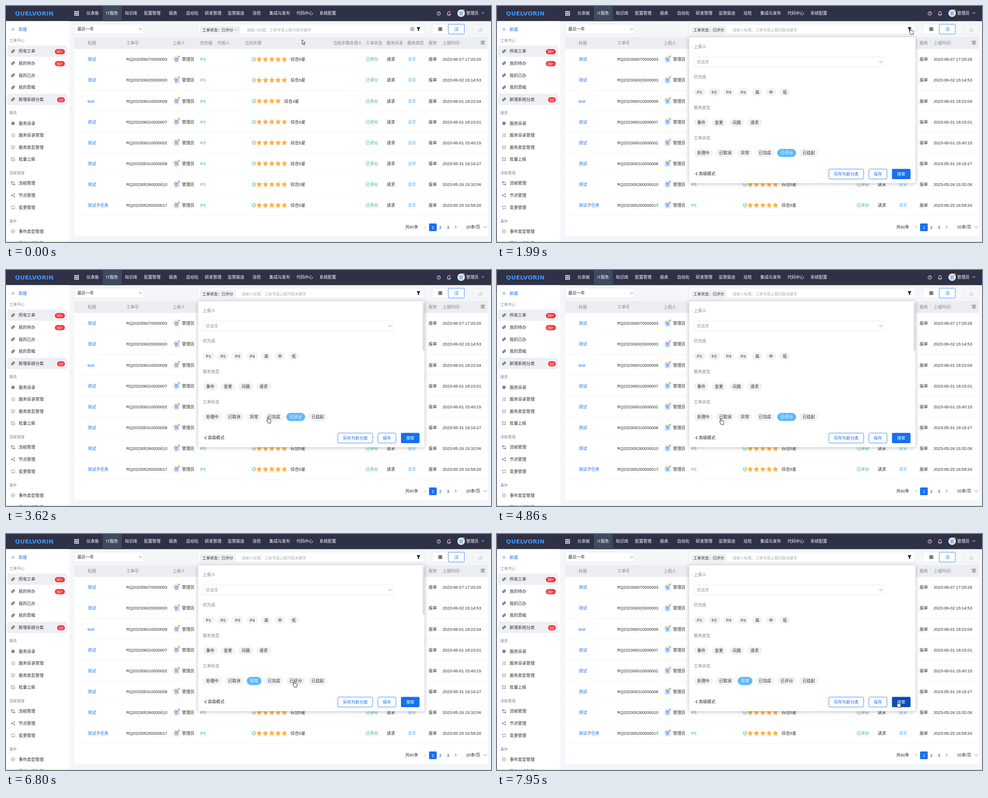
An HTML page for the animation above (8 s loop, 1072x522 px).

```html
<!DOCTYPE html>
<html lang="zh-CN">
<head>
<meta charset="utf-8">
<title>工单中心</title>
<style>
html, body { margin: 0; width: 100%; height: 100%; overflow: hidden; background: #f5f6fa; }
svg { display: block; width: 1072px; height: 522px; }
text { font: 9.2px "Liberation Sans", "Noto Sans CJK SC", "Noto Sans CJK JP", "Noto Sans CJK", sans-serif; white-space: pre; }
.mid { text-anchor: middle; }
.line { fill: none; stroke-linecap: round; stroke-linejoin: round; }
#panel { filter: drop-shadow(0 1px 4px rgba(0, 0, 0, .28)); }
</style>
</head>
<body>
<svg id="stage" viewBox="0 0 1072 522"></svg>
<script>
const INK = '#2b2c30', GRAY = '#85878d', BLUE = '#1670f0', SKY = '#5fb8fb', GREEN = '#2fb065', PILL = '#f3f3f6';
const ROW = 46.1;

const text = (x, y, s, fill = INK, size = 9.2, cls = '') =>
  `<text x="${x}" y="${y + size * .36}" fill="${fill}" class="${cls}" style="font-size:${size}px">${s}</text>`;
const mid = (x, y, s, fill, size) => text(x, y, s, fill, size, 'mid');
const box = (x, y, w, h, fill, r = 0, more = '') =>
  `<rect x="${x}" y="${y}" width="${w}" height="${h}" rx="${r}" fill="${fill}" ${more}/>`;
const line = (d, color = INK, w = 1) => `<path class="line" d="${d}" stroke="${color}" stroke-width="${w}"/>`;
const at = (x, y, inner, id = '') => `<g ${id && `id="${id}"`} transform="translate(${x} ${y})">${inner}</g>`;
const dot = (x, y, r, fill) => `<circle cx="${x}" cy="${y}" r="${r}" fill="${fill}"/>`;
const ring = (x, y, r, color, w = .9) => `<circle cx="${x}" cy="${y}" r="${r}" fill="none" stroke="${color}" stroke-width="${w}"/>`;
const down = (x, y, color = '#666') => line(`M${x - 2.8} ${y - 1.4}l2.8 2.8 2.8 -2.8`, color);
const border = color => `stroke="${color}" stroke-width="1"`;

function star(x, y, r, fill) {
  const pts = Array.from({ length: 10 }, (_, i) => {
    const a = i * Math.PI / 5, q = i % 2 ? r * .52 : r;
    return `${(x + q * Math.sin(a)).toFixed(2)},${(y - q * Math.cos(a)).toFixed(2)}`;
  });
  return `<polygon points="${pts.join(' ')}" fill="${fill}" stroke="${fill}" stroke-width=".8" stroke-linejoin="round"/>`;
}

const list = (x, y, color, w = 1) => [-3, 0, 3].map(d =>
  line(`M${x - 4} ${y + d}h.4M${x - 1.8} ${y + d}h5.8`, color, w)).join('');

const avatar = (x, y) => dot(x, y, 8.3, '#e8edf6') + mid(x, y + .3, '管', '#2b7de0', 9.4) +
  `<path d="M${x + 3} ${y - 7.6}l2.4 -1.2 2.4 1.6 -1.2 3.2 -2.6 -.8z" fill="#f9a83a"/>`;

function topBar() {
  const tabs = [[178, '仪表板'], [221, 'IT服务'], [263, '知识库'], [305, '配置管理'], [360, '报表'], [398, '自动化'],
    [439.5, '研发管理'], [490, '监管报送'], [545, '巡检'], [582, '集成与发布'], [642, '代码中心'], [693, '系统配置']];
  let s = box(0, 0, 1072, 33.5, '#2f3146') + box(214, 0, 42, 33.5, '#3d4a60');
  s += `<text x="20" y="20.5" fill="#3f97f6" style="font:bold 13px 'DejaVu Sans',sans-serif;letter-spacing:.2px">QUELVORIN</text>`;
  for (let i = 0; i < 9; i++) s += box(151 + i % 3 * 3.7, 11.3 + (i / 3 | 0) * 3.7, 2.7, 2.7, '#fff');
  s += tabs.map(([x, name]) => text(x, 16, name, '#fff')).join('');
  s += ring(956.5, 16.5, 3.9, '#fff', 1) + mid(956.5, 16.6, '?', '#fff', 6.5);
  s += '<path d="M975 19.3q1.3 -1 1.3 -4.3a2.7 2.7 0 0 1 5.4 0q0 3.300 1.300 4.300z" fill="none" stroke="#fff"/>' +
    line('M978 21.200h2', '#fff') + dot(980, 11.6, 1.8, '#f5333f');
  return s + avatar(1006, 16) + text(1017, 16, '管理员', '#fff') + down(1054, 15.5, '#fff');
}

const icons = {
  tag: '<g transform="rotate(-45)"><rect x="-4.500" y="-2.500" width="9" height="5" rx="1.300" fill="#777a80"/><path d="M-2.500 0H2" stroke="#fff" stroke-width=".8"/></g>',
  star: star(0, .3, 4.6, '#777a80'),
  list: list(0, 0, '#777a80', .9),
  bolt: ring(0, 0, 4, '#777a80', .8) + line('M.6 -2L-1.200 .5H1.200L-.5 2.300', '#777a80', .8),
  check: line('M4 0V3.500H-4V-3.500H4M-2 -1H1M-1.500 1L0 2.300 4 -1.500', '#777a80', .8),
  flow: line('M-2.500 -1V3H2M2.500 1V-3H-1', '#777a80') + box(-4.300, -4, 3, 3, '#777a80', 1) + box(1.500, 1.300, 3, 3, '#777a80', 1),
  share: line('M3 -3L-3 0 3 3', '#777a80') + dot(-3, 0, 1.400, '#777a80') + dot(3, -3, 1.300, '#777a80') + dot(3, 3, 1.300, '#777a80'),
  swap: line('M-3.800 0V-2.600H3.500L2 -4M3.800 0V2.600H-3.500L-2 4', '#777a80', .9),
  hex: line('M0 -4L3.600 -2V2L0 4 -3.600 2V-2Z', '#777a80', .8) + ring(0, 0, 1.300, '#777a80', .8)
};

function sideBar() {
  const items = [[100, 'tag', '所有工单'], [126.5, 'tag', '我的待办'], [153.3, 'tag', '我的已办'], [180, 'tag', '我的草稿'],
    [206.5, 'tag', '新增系统分类'], [259.3, 'star', '服务目录'], [286, 'list', '服务目录管理'], [312.5, 'bolt', '服务类型管理'],
    [339, 'check', '批量上报'], [392, 'flow', '流程管理'], [419, 'share', '节点管理'], [445.5, 'swap', '变更管理'],
    [498.5, 'hex', '事件类型管理'], [525, 'hex', '事件过程管理']];
  const heads = [[76, '工单中心'], [236, '服务'], [369, '流程管理'], [476, '事件']];
  const badge = (x, y, w, s) => box(x, y - 5.8, w, 11.6, '#f5333a', 5.8) + mid(x + w / 2, y, s, '#fff', 8.6);
  return box(0, 33.5, 139.5, 488.5, '#fff') + box(3, 87.500, 132, 25, '#eeeff3', 4) + box(3, 194, 132, 25, '#eeeff3', 4) +
    line('M12 51.500h7M15.500 48v7', '#4b90f2', .9) + text(28, 52, '新建', BLUE) +
    heads.map(([y, s]) => text(7.5, y, s, GRAY, 8.4)).join('') +
    items.map(([y, icon, s]) => at(15.5, y, icons[icon]) + text(28, y, s)).join('') +
    badge(108, 101, 22, '99+') + badge(108, 127.5, 22, '99+') + badge(113, 207.5, 17, '60');
}

const filterTag = (id, w, hint) => `<g id="${id}">` + box(429, 44.5, w, 16.5, '#eff0f4', 2) +
  text(434, 52.5, '工单状态：已评分', INK, 8.5) + text(hint, 53, '请输入标题、工单号或上报内容关键字', '#a9abb0', 8.4);

function toolBar() {
  const edge = border('#e6e7ec');
  return box(151, 40, 153.500, 22, '#fff', 3, edge) + text(157.5, 51, '最近一年') + down(297.5, 51) +
    box(425, 40, 499.500, 22.500, '#fff', 3, edge) +
    filterTag('tagHover', 89, 532) + line('M506 50.500l4 4M510 50.500l-4 4', '#aaa', .8) +
    ring(898, 51.2, 3.9, '#444') + line('M896.500 49.700l3 3M899.500 49.700l-3 3', '#444', .9) + '</g>' +
    filterTag('tagPlain', 78, 521) + '</g>' +
    '<path d="M907.500 47h8.500l-3 4.300v4.500l-2.500 -1.500v-3z" fill="#17181c"/>' +
    box(942.500, 40.300, 35, 21.700, '#fff', 3, edge) +
    [0, 1, 2, 3].map(i => box(956.3 + i % 2 * 4.2, 47.500 + (i >> 1) * 4.2, 2.900, 2.900, '#fff', 0, border('#333'))).join('') +
    box(977.500, 40.300, 35.500, 21.700, '#fff', 2, border('#3d87f4')) + list(995.5, 51.3, BLUE) +
    box(1032.500, 40.300, 32.500, 21.700, '#f6f7f9', 3, edge) +
    line('M1045 51.500v4h7.500v-4M1048.700 47.500v5M1047 51l1.700 1.700 1.700 -1.700', '#b3b5ba', .9);
}

function table() {
  const cols = [[180.5, '标题'], [266, '工单号'], [368, '上报人'], [429, '优先级'], [467, '代报人'], [528, '当前步骤'], [723, '当前步骤处理人'],
    [795, '工单状态'], [841, '服务目录'], [887, '服务类型'], [934, '服务'], [965, '上报时间']];
  const rows = [['测试', '06070000003', '06-07 17:20:26'], ['测试', '06020000003', '06-02 15:14:53'], ['test', '06010000009', '06-01 18:22:04'],
    ['测试', '06010000007', '06-01 18:15:01'], ['测试', '06010000002', '06-01 15:40:15'], ['测试', '05310000008', '05-31 18:16:27'],
    ['测试', '05260000010', '05-26 15:32:06'], ['测试子任务', '05250000017', '05-25 16:59:20']];
  const row = ([title, no, date], i) => {
    const stars = i == 2 ? 4 : 5;
    let s = text(180.5, 0, title, BLUE) + text(266, 0, 'RQ2023' + no) + avatar(377, 0) + text(389, 0, '管理员') + text(429.5, 0, 'P3', GREEN);
    s += ring(548, 0, 3.9, GREEN) + line('M546.200 .1l1.400 1.400 2.400 -2.700', GREEN, .9);
    for (let k = 0; k < stars; k++) s += star(559.7 + k * 13.9, .2, 5.8, '#fdb24f');
    s += text(559.5 + stars * 13.9, 0, `综合${stars}星`) + text(795, 0, '已评分', GREEN) + text(841.5, 0, '请求') +
      text(888, 0, '请求', SKY) + text(934, 0, '报单') + text(965, 0, '2023-' + date);
    return at(0, 118 + i * ROW, s) + line(`M151 ${95 + (i + 1) * ROW}H1065`, '#f1f2f4', .9);
  };
  const eye = '<path d="M954.500 0q4.500 -5.500 9 0q-4.500 5.500 -9 0z" fill="#222"/>' + dot(959, 0, 1.5, '#fff') + line('M955.500 -3.500l7 7', '#222', 1.1);
  const bin = box(1008.5, -2.500, 6.200, 6.700, '#222', .8) + box(1007.800, -4.300, 7.600, 1.300, '#222') + line('M1010.500 -1v3.500M1012.700 -1v3.500', '#fff', .7);
  return box(150.500, 69, 914.500, 439, '#fff', 4) + box(150.500, 69, 914.500, 26, '#ecedf1', 3) +
    cols.map(([x, s]) => text(x, 82, s, GRAY)).join('') +
    '<path d="M1002.500 81l1.800 -2 1.800 2zM1002.500 83l1.800 2 1.800 -2z" fill="#cdced3"/>' + list(1053.5, 81, INK) +
    at(0, 0, box(151, -23, 911, 45.500, '#ebecf0'), 'glow') +
    rows.map(row).join('') +
    at(0, 0, line('M162 3.800C157.500 .8 157 -2 159 -3.200Q161 -4 162 -1.900Q163 -4 165 -3.200C167 -2 166.500 .8 162 3.800Z', '#f08a4b', .9) +
      box(925, -22, 137, 44, '#ebecf0') + eye + text(966.5, 0, '隐藏') + line('M994.700 -3.500v7', '#aaa', .8) +
      bin + text(1018.5, 0, '删除') + line('M1055 -3l2.600 3 -2.600 3', '#6aa6f5', .9), 'actions') +
    `<g id="bars">${box(1061.500, 95, 3.500, 150, '#dcdde0', 1.700)}${box(152, 467.500, 738, 3.700, '#dcdde0', 1.800)}</g>`;
}

function pager() {
  return text(882.5, 489, '共60条') + line('M928.300 486l-2.800 3 2.800 3', '#aaa', .9) + box(935, 481, 17, 17, BLUE, 2) +
    mid(943.5, 489.5, '1', '#fff') + mid(960, 489.5, '2') + mid(977, 489.5, '3') + line('M992.500 486l2.800 3 -2.800 3', '#444', .9) +
    text(1017, 489, '20条/页') + down(1059.5, 489.5);
}

const pills = [];
function pillRow(y, w, items) {
  return items.map(([x, s, own = w]) => {
    pills.push([x - own / 2, y - 9, own, 18]);
    return `<g id="p${pills.length}">` + box(x - own / 2, y - 9, own, 18, PILL, 9) + mid(x, y, s) + '</g>';
  }).join('');
}

function panel() {
  const button = (x, w, s) => box(x, 360.700, w, 22, '#fff', 2.500, border('#3d87f4')) + mid(x + w / 2, 372, s, BLUE);
  const heads = [[90, '上报人'], [157, '优先级'], [224.5, '服务类型'], [292, '工单状态']];
  return '<g id="panel">' + box(424.500, 69, 500.500, 323, '#fff', 3) + heads.map(([y, s]) => text(435, y, s, GRAY)).join('') +
    box(435.500, 113, 420.500, 22, '#fff', 3, 'id="pick" stroke="#e6e7ec"') + text(441, 124, '请选择', '#a0a2a8') + down(848.5, 124) +
    pillRow(190.5, 25, [[447.7, 'P1'], [480, 'P2'], [512, 'P3'], [544.3, 'P4'], [575.3, '高', 23], [605.7, '中', 23], [636, '低', 23]]) +
    pillRow(258, 32.5, [[451.5, '事件'], [490.5, '变更'], [530, '问题'], [569.3, '请求']]) +
    pillRow(325, 41.7, [[456, '处理中'], [504.5, '已取消'], [548.3, '异常', 32.5], [592, '已完成'], [640.3, '已评分'], [689, '已挂起']]) +
    line('M442.500 368.300l-3 2.900 3 2.900', INK, 1.1) + text(446, 371, '高级模式') +
    button(733.500, 77, '另存为新分类') + button(822, 40, '保存') +
    box(873, 360.300, 41, 22.700, BLUE, 2.500, 'id="go"') + mid(893.5, 372, '搜索', '#fff') +
    box(921, 72, 4, 107, '#dcdde0', 2, 'id="scroll"') + '</g>';
}

const pointers = '<g id="cursor" stroke="#111" stroke-width=".9" stroke-linejoin="round" fill="#fff">' +
  '<path id="arrow" d="M.4 .4V10.500L2.700 8.400 4.300 12 6 11.300 4.500 7.700H7.500Z"/>' +
  '<path id="hand" d="M-1.200 8V1.500a1.200 1.200 0 0 1 2.400 0V5.200l4.200 .9q1.400 .4 1.400 1.800l-.9 4V13.600H-.2V12.200L-2.900 8.700q-.5 -1.300 .6 -1.600z"/></g>';

const stage = document.getElementById('stage');
stage.innerHTML = box(0, 0, 1072, 522, '#f5f6fa') + topBar() + sideBar() + toolBar() + table() + pager() + panel() +
  box(0, 521, 1072, 1, '#cfd1d6') + pointers;
const $ = id => document.getElementById(id);
const show = (id, on) => { $(id).style.display = on ? '' : 'none'; };

// start, end, step count, then [step, x, y] waypoints
const moves = [
  [420, 1220, 11, [3, 705, 69], [6, 850, 56], [8, 961, 46], [11, 920, 47]],
  [1370, 1600, 4, [4, 914, 49]],
  [2300, 3080, 11, [1, 908, 56], [3, 860, 96], [6, 700, 165], [9, 570, 250], [11, 543, 274]],
  [3150, 3770, 9, [5, 582, 318], [7, 579, 325], [9, 545, 328]],
  [4000, 4320, 5, [5, 485, 332]],
  [4470, 5010, 8, [6, 495, 328], [8, 539, 320]],
  [5180, 5180, 1, [1, 540, 320]],
  [5330, 5420, 2, [2, 540, 322]],
  [5630, 5630, 1, [1, 540, 321]],
  [6260, 6490, 4, [4, 637, 325]],
  [7120, 7870, 11, [1, 690, 335], [2, 785, 355], [3, 868, 386], [4, 935, 387], [6, 936, 388], [8, 905, 379], [11, 880, 364]],
  [7950, 7950, 1, [1, 886, 370]]
];

function cursorAt(t) {
  let x = 654, y = 74;
  for (const [start, end, count, ...stops] of moves) {
    if (t < start) break;
    const step = Math.min(count, 1 + Math.floor((t - start) / (end - start || 1) * (count - 1)));
    let from = 0;
    for (const [n, sx, sy] of stops) {
      const u = Math.min(1, (step - from) / (n - from));
      x += (sx - x) * u;
      y += (sy - y) * u;
      if (u < 1 || step === n) break;
      from = n;
    }
  }
  return [x, y];
}

const inside = (x, y, [l, t, w, h]) => x >= l && x < l + w && y >= t && y < t + h;
const pick = [435, 113, 421, 22], go = [873, 360, 41, 23];
const panelHot = [pick, go, [733, 360, 78, 23], [822, 360, 40, 23], ...pills];
const alwaysHot = [[905, 44, 14, 15], [942, 40, 71, 22]];

function setPill(id, fill, color) {
  const g = $(id);
  g.firstChild.setAttribute('fill', fill);
  g.lastChild.setAttribute('fill', color);
}

function draw(t) {
  const open = t >= 1990, [x, y] = cursorAt(t);
  const over = r => inside(x, y, r);
  const onPanel = open && over([424, 69, 501, 323]);
  const onTable = !onPanel && over([151, 95, 914, 368]);
  const hand = alwaysHot.some(over) || open && panelHot.some(over);

  show('tagHover', !open);
  show('tagPlain', open);
  show('panel', open);
  show('scroll', onPanel && y < 350);
  for (const id of ['glow', 'actions', 'bars']) show(id, onTable);
  if (onTable) {
    const shift = `translate(0 ${118 + Math.floor((y - 95) / ROW) * ROW})`;
    $('glow').setAttribute('transform', shift);
    $('actions').setAttribute('transform', shift);
  }
  $('pick').setAttribute('stroke', open && over(pick) ? '#5b9bf6' : '#e6e7ec');
  $('go').setAttribute('fill', open && over(go) ? '#0c4bb6' : BLUE);

  const picked = t >= 6090;
  setPill('p14', picked ? SKY : PILL, picked ? '#fff' : INK);
  if (t < 6720) setPill('p16', SKY, '#fff');
  else if (t < 6800) setPill('p16', '#b5dcf8', '#777');
  else setPill('p16', PILL, INK);

  $('cursor').setAttribute('transform', `translate(${x} ${y})`);
  show('hand', hand);
  show('arrow', !hand);
}

function tick() {
  draw(performance.now() % 8000);
  requestAnimationFrame(tick);
}
tick();
</script>
</body>
</html>
```
